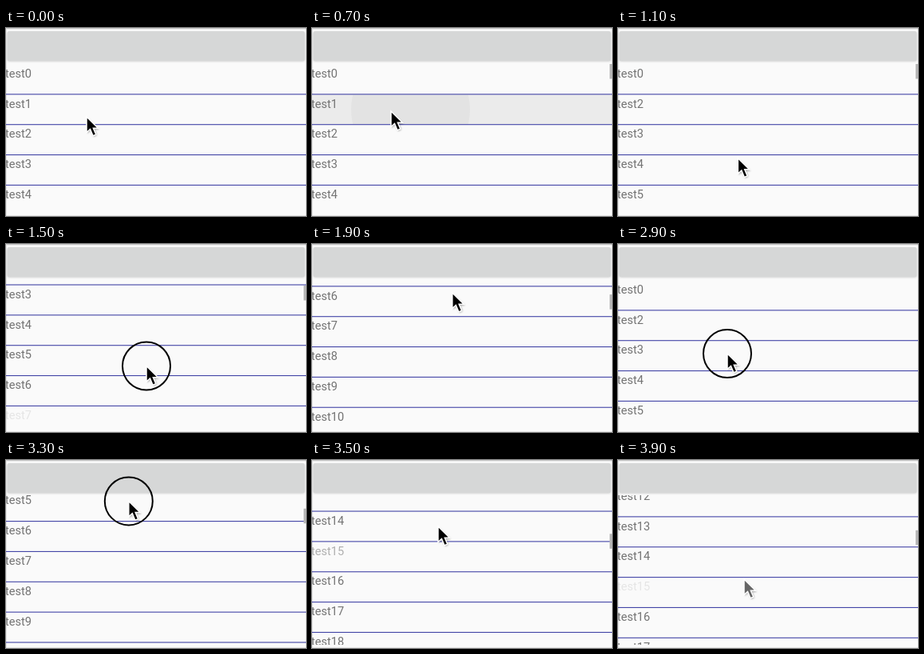
These frames come from a looping animation (376 px wide and 235 px high, 4 s). An HTML page:

```html
<!DOCTYPE html>
<html lang="en">
<head>
<meta charset="utf-8">
<title>List</title>
<style>
html, body { margin: 0; width: 100%; height: 100%; overflow: hidden; background: #fafafa; }
svg { display: block; width: 100vw; height: 100vh; }
text { font: 14.6px Roboto, Arial, sans-serif; fill: #737373; }
</style>
</head>
<body>
<svg viewBox="0 0 376 235">
  <defs>
    <clipPath id="listClip"><rect y="44" width="376" height="187"/></clipPath>
    <clipPath id="rowClip"><rect y="83.4" width="376" height="37"/></clipPath>
    <filter id="soft" x="-50%" y="-50%" width="200%" height="200%"><feGaussianBlur stdDeviation="1"/></filter>
  </defs>
  <rect width="376" height="235" fill="#fafafa"/>
  <rect width="376" height="1.3" fill="#c4c4c4"/>
  <rect width="0.7" height="235" fill="#dedede"/>
  <rect y="234.3" width="376" height="0.7" fill="#dedede"/>
  <rect x="1.5" y="5" width="373" height="37" rx="2.5" fill="#bbb" opacity=".6" filter="url(#soft)"/>
  <rect x="1.5" y="4" width="373" height="37.3" rx="2.5" fill="#d6d7d7"/>
  <g clip-path="url(#listClip)">
    <rect id="press" y="83" width="376" height="37.5" fill="#ebebeb"/>
    <circle id="ripple" cy="102" fill="#e3e3e3" clip-path="url(#rowClip)"/>
    <rect id="glow" width="376" height="37" fill="#f5f5f5"/>
    <g id="rows"></g>
  </g>
  <rect id="bar" x="373" width="3" height="18.5" fill="#b8b8b8"/>
  <circle id="ring" r="30" fill="none" stroke="#000" stroke-width="2"/>
  <g id="cursor">
    <path d="M1 2V21L5 17L9 25L13 23L10 16H16Z" opacity=".35" filter="url(#soft)"/>
    <path id="arrow" d="M0 0V19.5L4.5 15.4L8 23.8L11.8 22.2L8.4 14.2H14.5Z" stroke="#fff" stroke-width="1.5"/>
  </g>
</svg>
<script>
const LOOP = 4000, TICK = 100, PITCH = 37.85, COUNT = 24;
const NS = 'http://www.w3.org/2000/svg';
const $ = id => document.getElementById(id);

function set(el, attrs) {
  for (const name in attrs) el.setAttribute(name, attrs[name]);
  return el;
}
const add = (parent, tag, attrs) =>
  parent.appendChild(set(document.createElementNS(NS, tag), attrs));

// Progress from 0 to 1 between two times.
const ramp = (t, from, to) => Math.min(1, Math.max(0, (t - from) / (to - from)));
const mix = (a, b, p) => a + (b - a) * p;

// Pointer stops; down holds until the next stop.
const stops = [
  { t: 0, x: 101, y: 111 },
  { t: 100, x: 101, y: 111, down: true },
  { t: 700, x: 99, y: 104 },
  { t: 1300, x: 176, y: 192, down: true },
  { t: 1500, x: 176, y: 152.5, down: true },
  { t: 1800, x: 176, y: 40 },
  { t: 2400, x: 175, y: 166.5, down: true },
  { t: 2600, x: 172, y: 188 },
  { t: 2900, x: 137, y: 137, down: true },
  { t: 3400, x: 158, y: 30, down: true },
  { t: 3500, x: 158, y: 83 },
  { t: 3800, x: 158, y: 149 }
];

function pointer(t) {
  const i = stops.findLastIndex(s => s.t <= t);
  const a = stops[i], b = stops[i + 1] || a;
  const p = a === b ? 0 : ramp(t, a.t, b.t);
  return { x: mix(a.x, b.x, p), y: mix(a.y, b.y, p), down: a.down };
}

// Drag up, flick back to the top, fling far down, drag back a little.
function scrollAt(t) {
  const drag = 181.4 * ramp(t, 1200, 1800) ** 1.38 * (1 - ramp(t, 2400, 2600));
  return drag + 473 * ramp(t, 3200, 3500) - 44.7 * ramp(t, 3600, 3800);
}

const rows = Array.from({ length: COUNT }, (_, i) => {
  const g = add($('rows'), 'g', {});
  const label = add(g, 'text', { x: -1, y: 61.7 });
  label.textContent = 'test' + i;
  add(g, 'rect', { y: 82.3, width: 376, height: 1.1, fill: '#4244a6' });
  return { g, label };
});

function labelAlpha(i, t) {
  if (i === 7) return mix(.15, 1, ramp(t, 1500, 1700));
  if (i === 15) return mix(.55, .15, ramp(t, 3500, 3900));
  return 1;
}

function draw(t) {
  const scroll = scrollAt(t);
  const gone = ramp(t, 700, 900), closed = ramp(t, 900, 1100);
  rows.forEach(({ g, label }, i) => {
    const slot = i > 1 ? i - closed : i;
    set(g, { transform: `translate(0 ${slot * PITCH - scroll})`, opacity: i === 1 ? 1 - gone : 1 });
    set(label, { opacity: labelAlpha(i, t) });
  });

  const press = ramp(t, 200, 400) - gone, grow = ramp(t, 200, 700);
  set($('press'), { opacity: press });
  set($('ripple'), { cx: mix(101, 123.5, grow), r: 74.5 * (grow + gone), opacity: press });
  set($('glow'), {
    y: 83.4 + 4 * PITCH - scroll,
    opacity: ramp(t, 2200, 2400) - ramp(t, 2400, 2500)
  });
  set($('bar'), {
    y: 45 + scroll / 10,
    opacity: ramp(t, 600, 700) - ramp(t, 2600, 2800) + ramp(t, 3200, 3300)
  });

  const { x, y, down } = pointer(t);
  set($('cursor'), { transform: `translate(${x} ${y})` });
  set($('arrow'), { fill: t >= 3800 ? '#666' : '#000' });
  set($('ring'), { cx: x, cy: y, opacity: down ? 1 : 0 });
}

const start = performance.now();
function tick() {
  const t = (performance.now() - start) % LOOP;
  draw(Math.floor(t / TICK) * TICK);
  requestAnimationFrame(tick);
}
tick();
</script>
</body>
</html>
```
